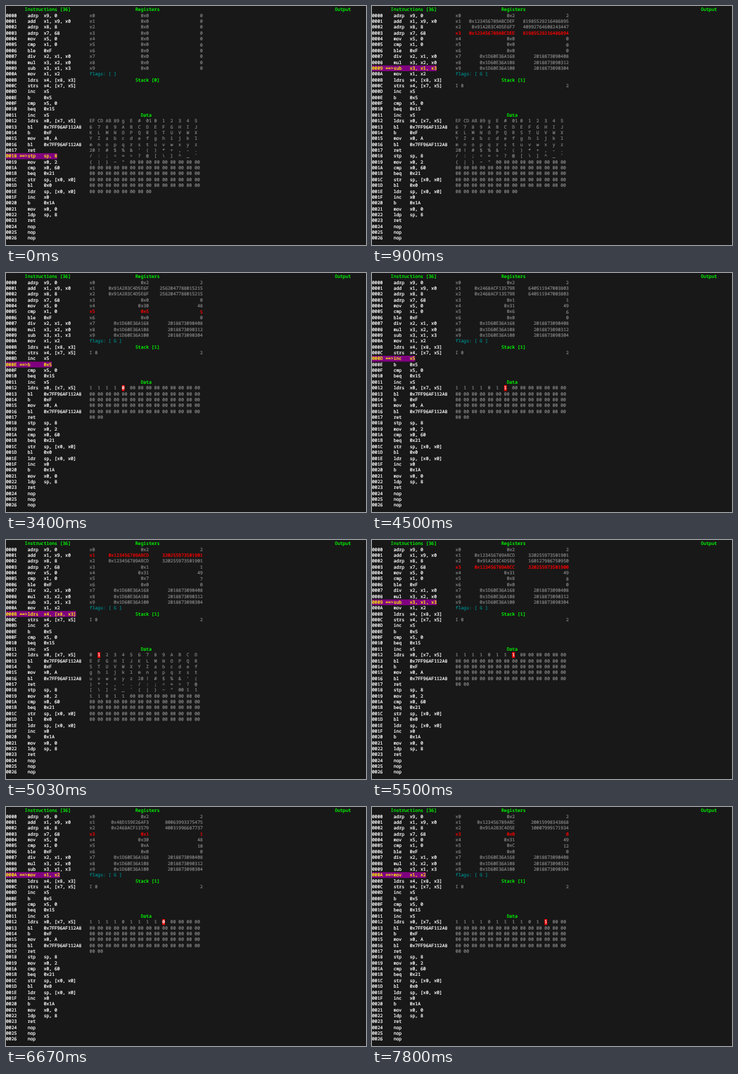
An HTML page with a canvas for the animation above (8000 ms loop, 512 by 341 pixels).

```html
<!DOCTYPE html>
<html lang="en">
<head>
<meta charset="utf-8">
<title>Register machine debugger</title>
<style>
  html, body { margin: 0; width: 100%; height: 100%; overflow: hidden; background: #181818; }
  canvas { display: block; width: 512px; height: 341px; }
</style>
</head>
<body>
<canvas id="screen"></canvas>
<script>
const LOOP = 8000, CELL_W = 3.833, CELL_H = 8.363, TOP = 1, BASELINE = 6.3;
const GREY = '#808080', GREEN = '#00ff00', RED = '#ff0000', WHITE = '#ffffff';

const listing = `adrp x9, 0|add x1, x9, x0|adrp x8, 8|adrp x7, 68|mov x5, 0|cmp x1, 0|ble 0xF
div x2, x1, x0|mul x3, x2, x0|sub x3, x1, x3|mov x1, x2|ldrs x4, [x8, x3]|strs x4, [x7, x5]
inc x5|b 0x5|cmp x5, 0|beq 0x15|inc x5|ldrs x0, [x7, x5]|bl 0x7FF96AF112A8|b 0xF|mov x0, A
bl 0x7FF96AF112A8|ret|stp sp, 8|mov x0, 2|cmp x0, 60|beq 0x21|str sp, [x0, x0]|bl 0x0
ldr sp, [x0, x0]|inc x0|b 0x1A|mov x0, 0|ldp sp, 8|ret|nop|nop|nop`
  .split(/[|\n]/).map(line => {
    const [, op, args] = line.match(/^(\w+) ?(.*)$/);
    return args ? op.padEnd(6) + args : op;
  });

// --- machine ---
const BASE = 0x1D60E36A100n, VALUE = 0x0123456789ABCDEFn;
const DIGITS = 8, BUFFER = 104, MEMORY = 176;
const charset = '0123456789ABCDEFGHIJKLMNOPQRSTUVWXYZabcdefghijklmnopqrstuvwxyz'
  + ' !#$%&\'()*+,-./:;<=>?@[\\]^_`{|}~"';

const mem = new Array(MEMORY).fill(0);
for (let i = 0; i < 8; i++) mem[i] = Number(VALUE >> BigInt(8 * i) & 255n);
[...charset].forEach((c, i) => mem[DIGITS + i] = c.charCodeAt(0));

const regs = new Array(10).fill(0n), stack = [];
let pc = 0x18, flag = '', view = { from: 0, mark: -1 };

const compare = (a, b) => flag = a > b ? 'G' : a < b ? 'L' : 'E';
const ops = {
  0x00: r => r[9] = BASE,
  0x01: r => r[1] = VALUE,
  0x02: r => r[8] = BASE + BigInt(DIGITS),
  0x03: r => r[7] = BASE + BigInt(BUFFER),
  0x04: r => r[5] = 0n,
  0x05: r => compare(r[1], 0n),
  0x07: r => r[2] = r[1] / r[0],
  0x08: r => r[3] = r[2] * r[0],
  0x09: r => r[3] = r[1] - r[3],
  0x0A: r => r[1] = r[2],
  0x0B: r => r[4] = BigInt(mem[DIGITS + Number(r[3])]),
  0x0C: r => mem[BUFFER + Number(r[5])] = Number(r[4]),
  0x0D: r => r[5]++,
  0x19: r => r[0] = 2n,
  0x1A: r => compare(r[0], 0x60n),
  0x1C: r => stack.push(r[0])
};
const jumps = { 0x0E: 0x05, 0x1D: 0x00 };

function step() {
  const before = [...regs];
  if (ops[pc]) ops[pc](regs);
  pc = jumps[pc] ?? pc + 1;
  if (pc === 0x0B) view = { from: DIGITS, mark: Number(regs[3]) };
  if (pc === 0x0C) view = { from: BUFFER, mark: Number(regs[5]) };
  return regs.findIndex((v, i) => v !== before[i]);
}

const snapshot = changed =>
  ({ pc, flag, view, changed, regs: [...regs], mem: [...mem], stack: [...stack] });

// --- timing: [ms, steps done, screen updates since the previous mark] ---
const marks = [
  [0, 0], [300, 5], [600, 10], [900, 15], [1200, 20], [1470, 25], [1770, 30], [2100, 35],
  [2370, 40], [2670, 45], [3030, 52], [3400, 60], [3770, 68], [4130, 78], [4500, 79],
  [4730, 81], [5030, 87, 5], [5130, 89], [5930, 103, 13], [6000, 104], [6230, 109, 4],
  [6370, 111], [6530, 114], [6670, 116], [6800, 118], [6930, 121], [7100, 124],
  [7270, 127], [7430, 130], [7630, 133], [7800, 136]
];
const updates = marks.flatMap(([t, n, count = 1], i) => {
  const [t0, n0] = marks[i - 1] || [t, n];
  return Array.from({ length: count }, (_, k) => {
    const f = (k + 1) / count;
    return { time: Math.round(t0 + (t - t0) * f), step: Math.round(n0 + (n - n0) * f) };
  });
});

const states = [snapshot(-1)];
while (states.length <= updates.at(-1).step) states.push(snapshot(step()));

// --- drawing ---
const canvas = document.getElementById('screen');
const ctx = canvas.getContext('2d');
const dpr = window.devicePixelRatio || 1;
canvas.width = 512 * dpr;
canvas.height = 341 * dpr;
ctx.scale(dpr, dpr);
ctx.rotate(1e-4); // an invisible tilt keeps baselines from snapping to whole pixels
ctx.font = `${CELL_W / 0.6}px "Noto Sans Mono", monospace`;
ctx.textRendering = 'geometricPrecision';
ctx.lineWidth = 0.22;
ctx.lineJoin = 'round';

const hex = (n, width) => n.toString(16).toUpperCase().padStart(width, '0');

function put(text, col, row, color, back) {
  const y = TOP + row * CELL_H;
  if (back) {
    ctx.fillStyle = back;
    ctx.fillRect(col * CELL_W, y, text.length * CELL_W, CELL_H);
  }
  ctx.fillStyle = ctx.strokeStyle = color;
  [...text].forEach((c, i) => {
    if (c === ' ') return;
    const x = (col + i) * CELL_W;
    ctx.fillText(c, x, y + BASELINE);
    ctx.strokeText(c, x, y + BASELINE);
  });
}
const putRight = (text, end, row, color) => put(text, end - text.length, row, color);

function draw(s) {
  ctx.fillStyle = '#181818';
  ctx.fillRect(-1, -1, 514, 343);

  put('Instructions [36]', 7, 0, GREEN);
  put('Registers', 48, 0, GREEN);
  put('Output', 122, 0, GREEN);
  put(`Stack [${s.stack.length}]`, 48, 12, GREEN);
  put('Data', 50, 18, GREEN);

  listing.forEach((code, i) => {
    const here = i === s.pc;
    const line = `${hex(i, 4)} ${here ? '==>' : '   '}${code}`;
    put(line, 0, i + 1, here ? '#ffff00' : WHITE, here && '#800080');
  });

  s.regs.forEach((v, i) => {
    const color = i === s.changed ? RED : GREY;
    put('x' + i, 31, i + 1, color);
    putRight('0x' + hex(v, 1), 53, i + 1, color);
    putRight(String(v), 73, i + 1, color);
  });
  put(`flags: [ ${s.flag ? s.flag + ' ' : ''}]`, 31, 11, '#008080');

  s.stack.forEach((v, i) => {
    put('I ' + i, 31, 13 + i, GREY);
    putRight(String(v), 73, 13 + i, GREY);
  });

  s.mem.slice(s.view.from).forEach((b, i) => {
    const text = b > 32 && b < 127 ? String.fromCharCode(b) : hex(b, 2);
    const marked = i === s.view.mark;
    put(text, 31 + i % 14 * 3, 19 + Math.floor(i / 14), marked ? WHITE : GREY, marked && RED);
  });
}

const start = performance.now();
let shown = -1;
function tick() {
  const t = (performance.now() - start) % LOOP;
  const { step: n } = updates.findLast(u => u.time <= t);
  if (n !== shown) draw(states[shown = n]);
  requestAnimationFrame(tick);
}
tick();
</script>
</body>
</html>
```
